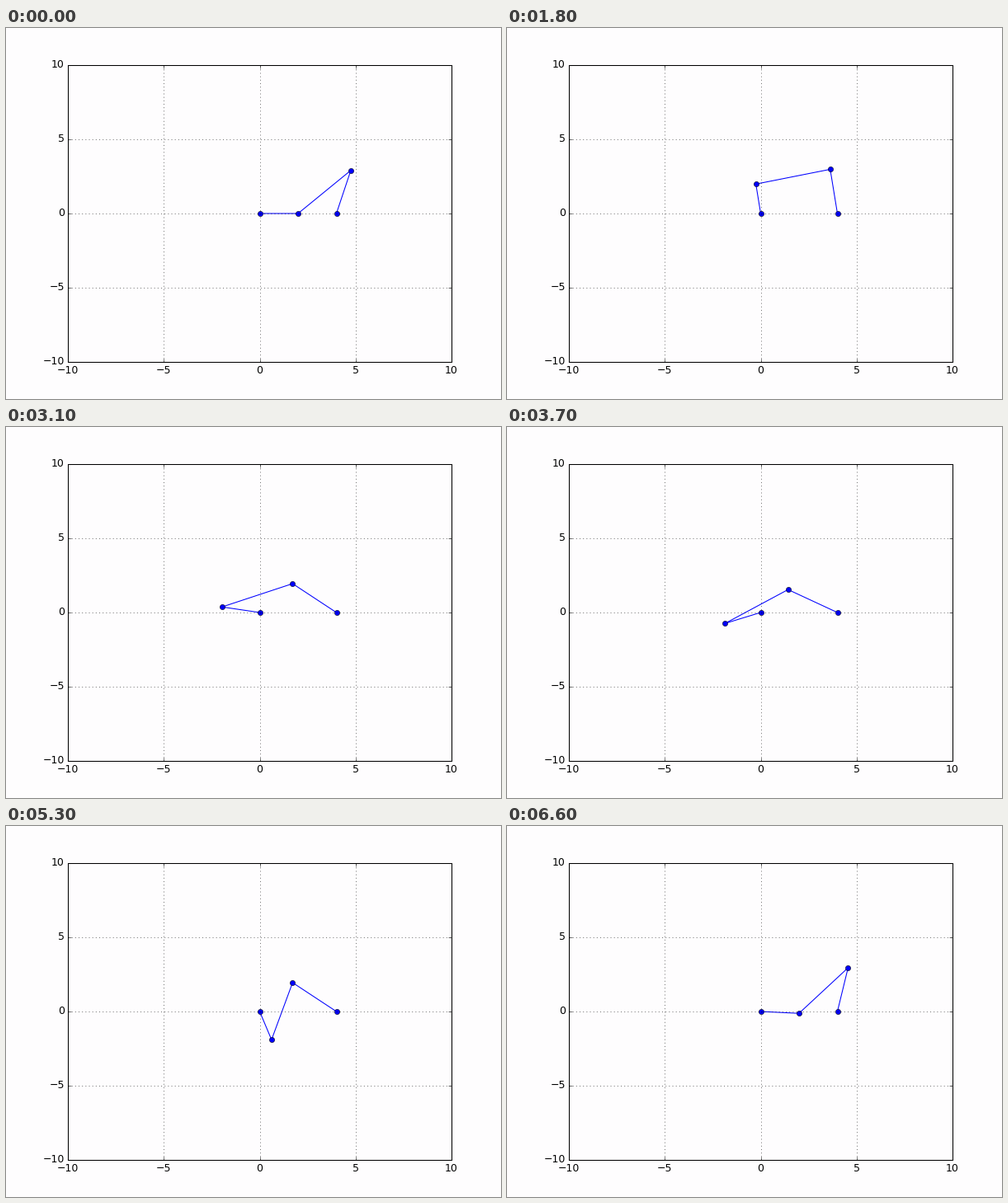
Animation of 600 by 450 pixels, one loop 6.7 s. Source, as a matplotlib script:

```python
import numpy as np
import matplotlib.pyplot as plt
from matplotlib.animation import FuncAnimation

FRAMES = 67
INTERVAL = 100
STEPS = 100  # crank positions per turn
PAPER = "#fefdfe"

CRANK, COUPLER, ROCKER = 2.0, 4.0, 3.0
BASE = np.array([0.0, 0.0])
PIVOT = np.array([4.0, 0.0])

plt.style.use("classic")
plt.rcParams.update({
    "font.family": "DejaVu Sans",
    "figure.dpi": 75,
    "savefig.dpi": "figure",
    "figure.facecolor": PAPER,
    "savefig.facecolor": PAPER,
    "axes.facecolor": PAPER,
    "toolbar": "None",
})


def linkage(theta):
    """Joints of the four-bar linkage for a given crank angle."""
    pin = BASE + CRANK * np.array([np.cos(theta), np.sin(theta)])
    span = PIVOT - pin
    dist = np.hypot(*span)
    along = (COUPLER**2 - ROCKER**2 + dist**2) / (2 * dist)
    height = np.sqrt(COUPLER**2 - along**2)
    unit = span / dist
    normal = np.array([-unit[1], unit[0]])
    elbow = pin + along * unit + height * normal
    return np.array([BASE, pin, elbow, PIVOT])


fig, ax = plt.subplots(figsize=(8, 6))
ax.set_xlim(-10, 10)
ax.set_ylim(-10, 10)
ax.set_xticks(range(-10, 11, 5))
ax.set_yticks(range(-10, 11, 5))
ax.grid(True)
bars, = ax.plot([], [], "bo-", lw=1)


def update(frame):
    step = (3 * frame + 1) // 2  # 1.5 crank steps per frame, rounded up
    bars.set_data(*linkage(2 * np.pi * step / STEPS).T)
    return bars,


anim = FuncAnimation(fig, update, frames=FRAMES, interval=INTERVAL,
                     repeat=True, repeat_delay=0, blit=False)
plt.show()
```
